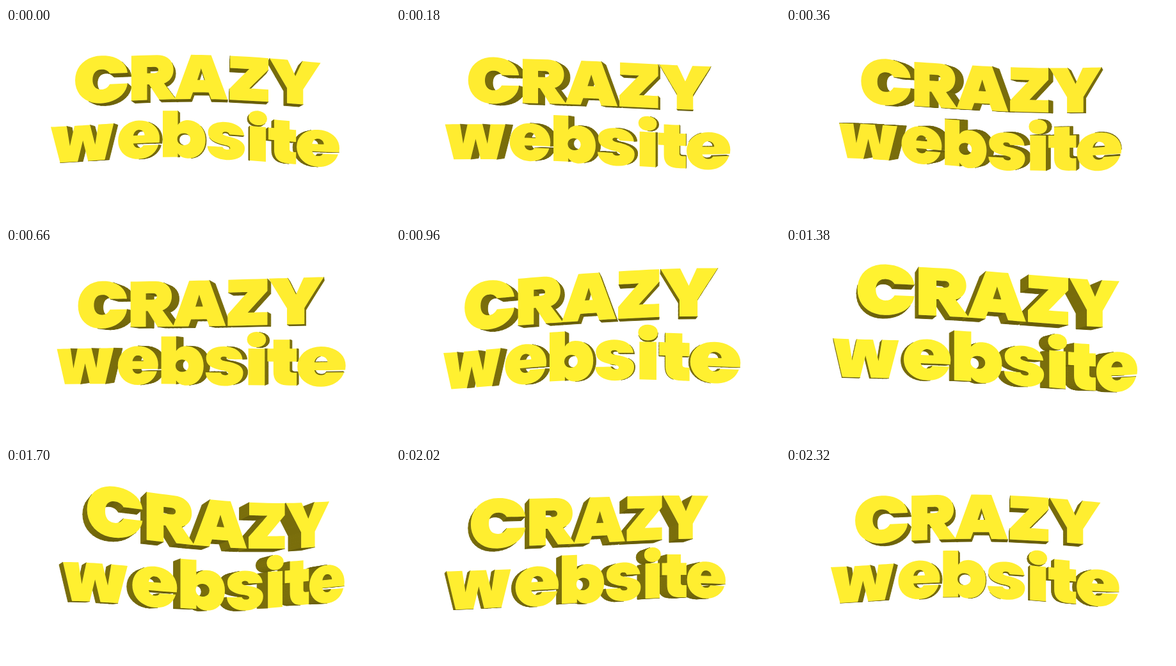
An HTML page with a canvas that plays this animation: 600 by 300 pixels, repeating every 2340 ms.

```html
<!DOCTYPE html>
<html lang="en">
<head>
<meta charset="utf-8">
<title>CRAZY website</title>
<style>
  html, body { margin: 0; width: 100%; height: 100%; overflow: hidden; background: #fff; }
  canvas { display: block; width: 600px; height: 300px; }
</style>
</head>
<body>
<canvas id="stage" width="600" height="300" role="img" aria-label="CRAZY website"></canvas>
<script>
const ctx = document.getElementById('stage').getContext('2d');
const LOOP = 2340, STEP = 20;
const DEPTH_PULL = 0.045;

// Outlines with y pointing up from the baseline; solids clockwise, holes counterclockwise.
const GLYPHS = {
  C: 'M82 28 C80 10 62 -2 40 -2 C16 -2 0 14 0 36 C0 58 16 74 41 74 C63 74 80 63 82 45 L54 45 C51 50 46 52 41 52 C32 52 27 46 27 36 C27 26 32 20 41 20 C47 20 51 23 54 28',
  R: 'M0 0 L0 72 L41 72 C57 72 67 62 67 48 C67 37 61 29 52 26 L71 0 L44 0 L28 25 L25 25 L25 0 M25 43 L37 43 C45 43 45 53 37 53 L25 53',
  A: 'M0 0 L26 72 L58 72 L84 0 L58 0 L54 11 L29 11 L25 0 M36 31 L48 31 L42 50',
  Z: 'M0 0 L0 18 L31 52 L1 52 L1 72 L61 72 L61 53 L31 20 L61 20 L61 0',
  Y: 'M27 0 L27 25 L0 72 L28 72 L40 46 L51 72 L79 72 L52 25 L52 0',
  w: 'M14 0 L0 57 L24 57 L29 25 L36 57 L60 57 L68 25 L73 57 L97 57 L83 0 L57 0 L49 33 L41 0',
  e: 'M64 20 C60 6 48 -2 33 -2 C14 -2 0 11 0 29 C0 47 14 60 33 60 C52 60 66 48 66 30 L65.5 23.5 L24 23.5 C25 19 28 16 33 16 C36 16 39 17 40 20 M24 36 L42 36 C42 41 38 45 33 45 C28 45 25 41 24 36',
  b: 'M0 0 L0 75 L24 75 L24 52 C27 57 33 60 40 60 C57 60 68 47 68 29 C68 11 57 -2 40 -2 C33 -2 27 1 24 6 L24 0 M23 29 C23 16 44 16 44 29 C44 42 23 42 23 29',
  s: 'M59 19 C59 6 47 -2 30 -2 C13 -2 1 6 0 19 L24 19 C25 16 28 15 31 15 C34 15 36 16 36 18 C36 21 30 22 23 23 C10 26 1 30 1 42 C1 53 13 60 29 60 C46 60 57 52 58 40 L35 40 C34 43 32 44 29 44 C26 44 24 43 24 41 C24 38 30 37 37 36 C50 33 59 29 59 19',
  i: 'M2 0 L2 57 L27 57 L27 0 M0 71 C0 87 29 87 29 71 C29 55 0 55 0 71',
  t: 'M43 0 L32 0 C17 0 9 6 9 21 L9 37 L0 37 L0 57 L9 57 L9 71 L33 71 L33 57 L43 57 L43 37 L33 37 L33 24 C33 21 35 20 38 20 L43 20'
};

const ROWS = [
  { text: 'CRAZY', left: [116, 204, 273, 360, 423] },
  { text: 'website', left: [79, 183, 254, 325, 390, 421, 465] }
];

// Bend of the lettering at key times: sideways shift, the two baselines, height at
// both ends, sideways depth, the level the depth recedes to, and the face's green.
const POSES = [
  { at: 0, shift: [-9, -8, -10, -11, -10], base: [[118, 114, 111, 115, 124], [211, 204, 202, 209, 216]],
    size: [0.99, 0.93], depth: [9, 2, -10], horizon: 200, green: 238 },
  { at: 360, shift: [4, -3, -8, -11, -7], base: [[116, 121, 128, 132, 130], [203, 209, 218, 223, 219]],
    size: [0.95, 0.97], depth: [14, 12, 0], horizon: 150, green: 235 },
  { at: 960, shift: [-5, -13, -14, -10, 7], base: [[134, 122, 114, 108, 108], [221, 213, 206, 206, 211]],
    size: [1, 1.05], depth: [13, 5, -6], horizon: 195, green: 240 },
  { at: 1380, shift: [-5, 2, 14, 20, 18], base: [[102, 104, 111, 120, 125], [201, 204, 210, 220, 221]],
    size: [1.05, 1.01], depth: [0, -10, -21], horizon: 220, green: 242 },
  { at: 1700, shift: [10, 15, 20, 15, -2], base: [[101, 111, 123, 126, 120], [208, 214, 221, 217, 207]],
    size: [1.07, 0.96], depth: [-6, -13, -25], horizon: 235, green: 240 },
  { at: 2020, shift: [0, 4, 4, -5, -16], base: [[128, 122, 117, 112, 111], [222, 216, 209, 203, 203]],
    size: [1.06, 0.92], depth: [-3, -10, -17], horizon: 225, green: 238 }
];

function flatten(path) {
  const contours = [];
  let points, x, y;
  const lineTo = (a, b) => {
    for (let k = 1; k <= 4; k++) points.push([x + (a - x) * k / 4, y + (b - y) * k / 4]);
  };
  for (const [, op, args] of path.matchAll(/([MLC])([^MLC]*)/g)) {
    const n = args.trim().split(/\s+/).map(Number);
    if (op === 'M') contours.push(points = [n]);
    if (op === 'L') lineTo(...n);
    if (op === 'C') {
      for (let k = 1; k <= 10; k++) {
        const s = k / 10, r = 1 - s;
        const mix = (p, a, b, c) => r * r * r * p + 3 * r * r * s * a + 3 * r * s * s * b + s * s * s * c;
        points.push([mix(x, n[0], n[2], n[4]), mix(y, n[1], n[3], n[5])]);
      }
    }
    [x, y] = n.slice(-2);
  }
  return contours;
}

const letters = ROWS.flatMap(({ text, left }, row) => [...text].map((char, k) => ({
  row,
  contours: flatten(GLYPHS[char]).map(c => c.map(([x, y]) => [x + left[k], y]))
})));

// Polynomial through evenly spaced values, with u running from 0 to 1.
function through(values, u) {
  const last = values.length - 1;
  return values.reduce((sum, value, i) => {
    for (let j = 0; j <= last; j++) if (j !== i) value *= (u * last - j) / (i - j);
    return sum + value;
  }, 0);
}

function hermite(a, b, c, d, times, t) {
  if (Array.isArray(a)) return a.map((_, i) => hermite(a[i], b[i], c[i], d[i], times, t));
  const [ta, tb, tc, td] = times, h = tc - tb, s = (t - tb) / h;
  const m = (c - a) / (tc - ta) * h, n = (d - b) / (td - tb) * h;
  return b + s * (m + s * (3 * (c - b) - 2 * m - n + s * (2 * (b - c) + m + n)));
}

function poseAt(t) {
  const count = POSES.length;
  const i = POSES.findLastIndex(p => p.at <= t);
  const near = [i - 1, i, i + 1, i + 2].map(k => POSES[(k + count) % count]);
  const times = near.map((p, k) => p.at + LOOP * Math.floor((i - 1 + k) / count));
  const pose = {};
  for (const key of ['shift', 'base', 'size', 'depth', 'horizon', 'green']) {
    pose[key] = hermite(...near.map(p => p[key]), times, t);
  }
  return pose;
}

function place(pose, row, [x, h]) {
  const u = (x - 80) / 450;
  const y = through(pose.base[row], u) - h * through(pose.size, u);
  return {
    x: x + through(pose.shift, u),
    y,
    dx: through(pose.depth, u),
    dy: (pose.horizon - y) * DEPTH_PULL
  };
}

function drawSides(points) {
  points.forEach((p, i) => {
    const q = points[(i + 1) % points.length];
    const nx = q.y - p.y, ny = p.x - q.x, length = Math.hypot(nx, ny);
    if (!length || nx * p.dx + ny * p.dy <= 0) return;
    const tone = 102 + 20 * Math.abs(nx) / length;
    ctx.fillStyle = ctx.strokeStyle = `rgb(${tone}, ${tone * 0.9}, ${tone * 0.09})`;
    ctx.beginPath();
    ctx.moveTo(p.x, p.y);
    ctx.lineTo(q.x, q.y);
    ctx.lineTo(q.x + q.dx, q.y + q.dy);
    ctx.lineTo(p.x + p.dx, p.y + p.dy);
    ctx.closePath();
    ctx.fill();
    ctx.stroke();
  });
}

function drawFace(contours) {
  ctx.beginPath();
  for (const points of contours) {
    points.forEach((p, i) => i ? ctx.lineTo(p.x, p.y) : ctx.moveTo(p.x, p.y));
    ctx.closePath();
  }
  ctx.fill();
}

function draw(t) {
  const pose = poseAt(t);
  const shapes = letters.map(({ row, contours }) => contours.map(c => c.map(p => place(pose, row, p))));
  ctx.fillStyle = '#fff';
  ctx.fillRect(0, 0, 600, 300);
  ctx.lineWidth = 0.9;
  ctx.lineJoin = 'round';
  shapes.flat().forEach(drawSides);
  ctx.fillStyle = `rgb(255, ${pose.green}, 48)`;
  shapes.forEach(drawFace);
}

function tick() {
  draw(Math.floor(performance.now() % LOOP / STEP) * STEP);
  requestAnimationFrame(tick);
}
tick();
</script>
</body>
</html>
```
